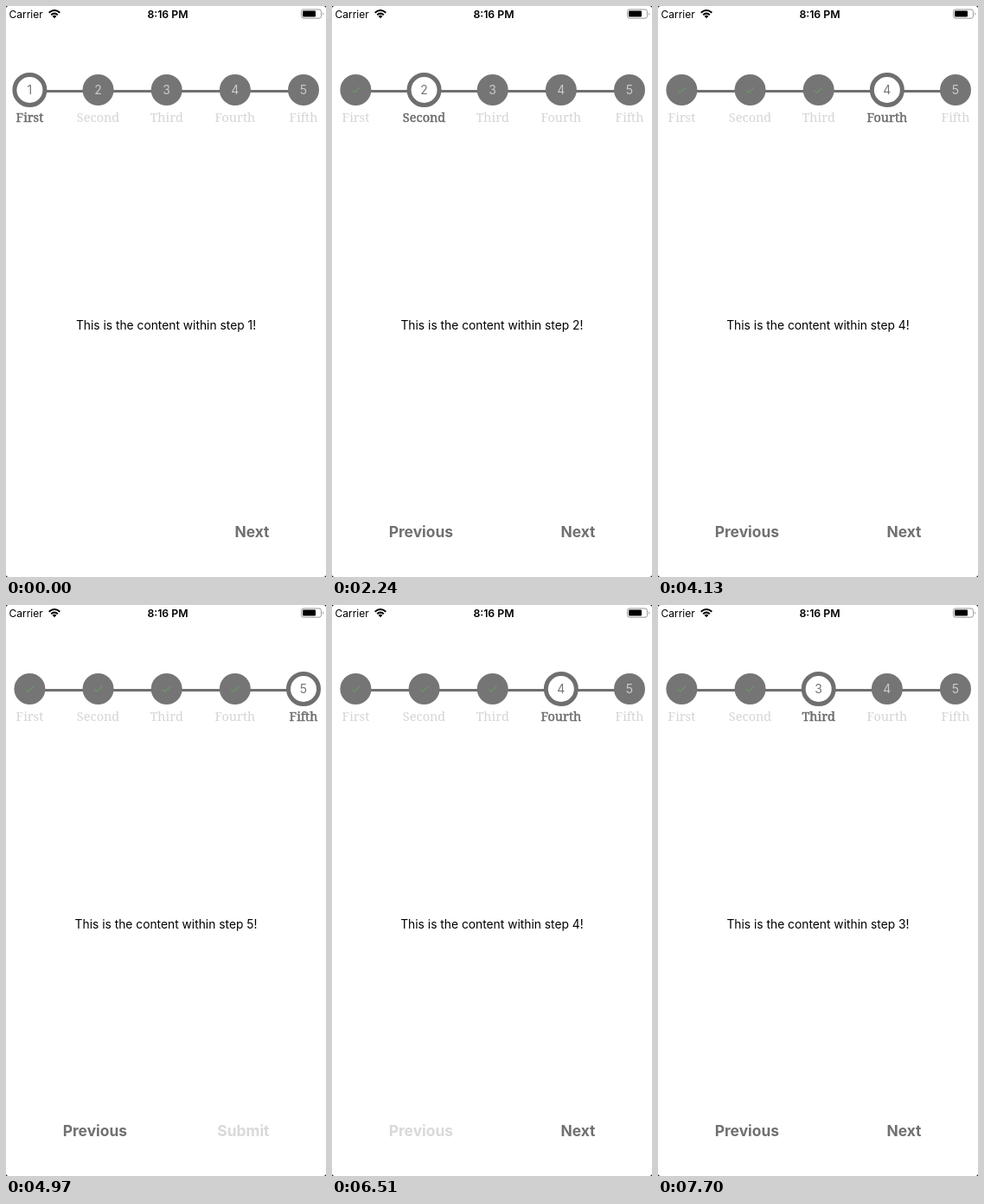
Animation, 370 px wide and 660 px high, one loop 8 s. Source, as an HTML page:

```html
<!DOCTYPE html>
<html lang="en">
<head>
<meta charset="utf-8">
<title>Progress steps</title>
<style>
  html, body { margin: 0; width: 100%; height: 100%; overflow: hidden; background: #000; }
  svg { display: block; font-family: Inter, sans-serif; }
  .step { text-anchor: middle; font-size: 14px; }
  .step circle { fill: #757575; }
  .step .number { fill: #cbcbcb; }
  .step .label { font: 14.5px "Noto Serif", serif; fill: #d5d5d5; }
  .step path { fill: none; stroke: #5fae5c; visibility: hidden; }
  .done path { visibility: visible; }
  .done .number { visibility: hidden; }
  .active circle { fill: #fff; stroke: #6f6f6f; stroke-width: 5; }
  .active .number { fill: #757575; }
  .active .label { fill: #6b6b6b; stroke: #6b6b6b; stroke-width: .45; }
  .button { font-size: 17.4px; font-weight: 700; fill: #707070; }
</style>
</head>
<body>
<svg width="370" height="660" viewBox="0 0 370 660">
  <rect width="370" height="660" rx="3" fill="#fff"/>

  <g font-size="12">
    <text x="3.5" y="13.5">Carrier</text>
    <text x="187" y="13.5" text-anchor="middle" font-size="12.3" font-weight="600">8:16 PM</text>
    <g fill="none" stroke="#000" stroke-width="2">
      <path d="M49.7 7.7Q56 2.3 62.3 7.7M52.2 10.3Q56 7 59.8 10.3"/>
    </g>
    <path d="M53.6 11.7Q56 9.9 58.4 11.7L56 14.2Z"/>
    <rect x="341.5" y="4" width="23" height="10.2" rx="2.5" fill="none" stroke="#999"/>
    <rect x="343" y="5.6" width="15" height="7" rx="1"/>
    <path d="M366 7.5q2 1.7 0 3.5z" fill="#999"/>
  </g>

  <path d="M27 98.5H344" stroke="#707070" stroke-width="3"/>
  <g id="steps"></g>

  <text id="content" x="185" y="373.5" text-anchor="middle" font-size="13.8"></text>
  <text id="previous" class="button" x="65.7" y="614">Previous</text>
  <text id="next" class="button" x="304.5" y="614" text-anchor="end"></text>
</svg>
<script>
const LOOP = 8000, TICK = 70, FADE = 250, FADE_LEAD = 43;
const $ = id => document.getElementById(id);

// Each tap: press time, release time, direction
const taps = [
  [1610, 1820, 1], [2730, 2870, 1], [3780, 3920, 1],
  [4760, 4970, 1], [6370, 6510, -1], [7280, 7490, -1]
];

$('steps').innerHTML = ['First', 'Second', 'Third', 'Fourth', 'Fifth'].map((name, i) => `
  <g class="step" transform="translate(${27.4 + 79.15 * i} 97)">
    <circle/>
    <path d="M-4.6 .6l2.8 2.6L4.8-3"/>
    <text class="number" y="5">${i + 1}</text>
    <text class="label" y="37">${name}</text>
  </g>`).join('');
const steps = [...$('steps').children];

const easeInOut = p => p * p * (3 - 2 * p);

function opacityAt(t, direction) {
  let opacity = 1;
  for (const [press, release, dir] of taps) {
    if (dir !== direction || t < press) continue;
    const p = t < release ? 0 : Math.min(1, (t - release + FADE_LEAD) / FADE);
    opacity = 0.2 + 0.8 * easeInOut(p);
  }
  return opacity;
}

function render(time) {
  const t = Math.floor(time % LOOP / TICK) * TICK;
  const current = taps.reduce((n, [, release, dir]) => t >= release ? n + dir : n, 0);

  steps.forEach((step, i) => {
    step.setAttribute('class', 'step' + (i < current ? ' done' : i === current ? ' active' : ''));
    step.firstElementChild.setAttribute('r', i === current ? 17.5 : 18);
  });
  $('content').textContent = `This is the content within step ${current + 1}!`;
  $('next').textContent = current === 4 ? 'Submit' : 'Next';
  $('next').style.opacity = opacityAt(t, 1);
  $('previous').style.opacity = current ? opacityAt(t, -1) : 0;
}

const start = performance.now();
function frame() {
  render(performance.now() - start);
  requestAnimationFrame(frame);
}
frame();
</script>
</body>
</html>
```
